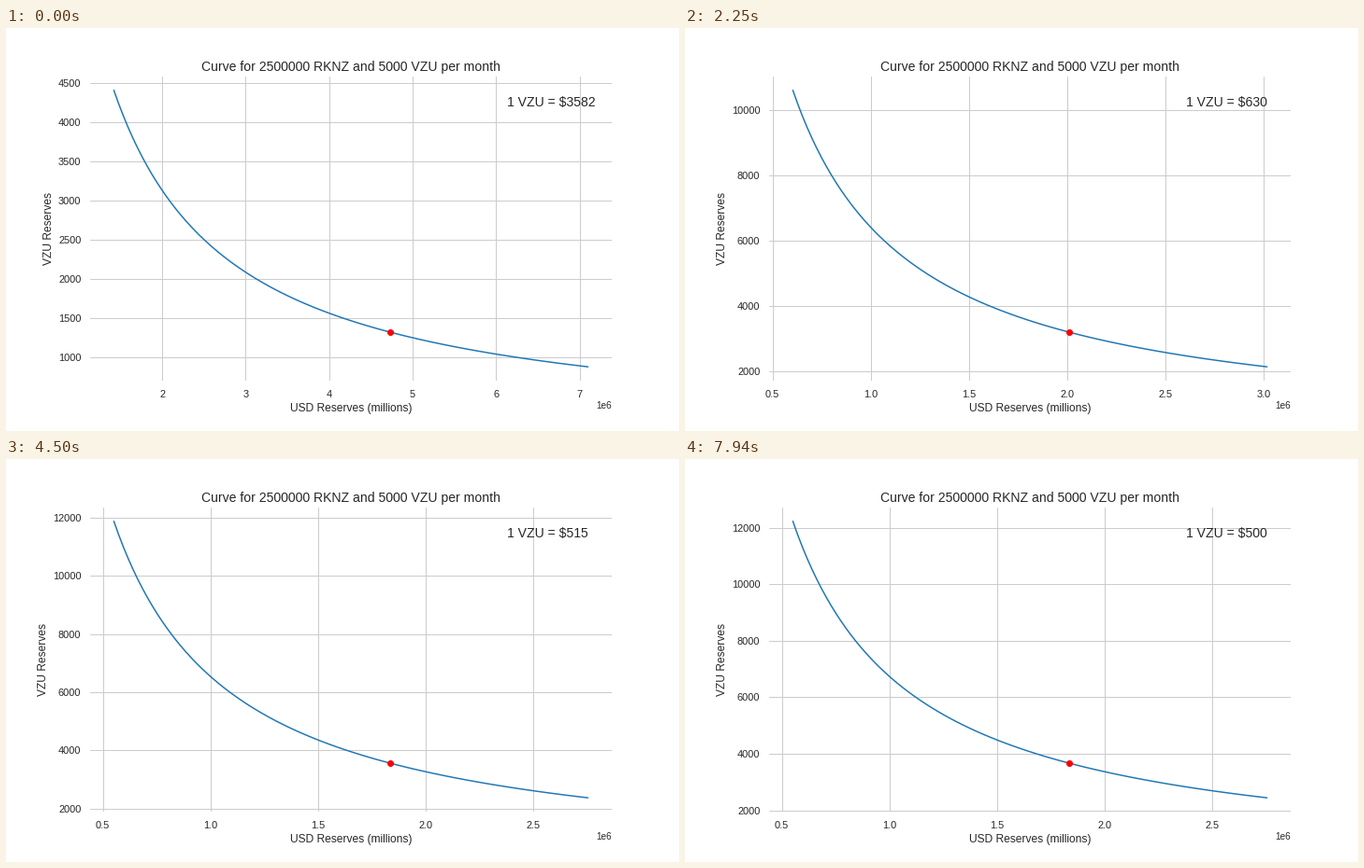
A matplotlib script for the animation above (8000 ms loop, 720 by 432 pixels).

```python
import numpy as np
import matplotlib.pyplot as plt
from matplotlib.animation import FuncAnimation

FRAMES, INTERVAL = 160, 50
CASH_PER_MONTH, COIN_PER_MONTH = 2500000, 5000
STEPS_PER_MONTH = 61
SUBSTEPS = 60
FEE = 0.01
INK, GRID = "#262626", "#cccccc"

plt.rcParams.update({
    "font.family": "Liberation Sans",
    "text.color": INK,
    "axes.labelcolor": INK,
    "xtick.color": INK,
    "ytick.color": INK,
    "axes.axisbelow": True,
    "lines.solid_capstyle": "round",
})


def swap(paid, pool_in, pool_out):
    """Amount a constant-product pool gives out, after the fee."""
    net = paid * (1 - FEE)
    return pool_out * net / (pool_in + net)


def simulate(steps):
    """Pool reserves after each step of steady two-way selling."""
    cash, coin = 5e6, 1250.0
    cash_in = CASH_PER_MONTH / STEPS_PER_MONTH / SUBSTEPS
    coin_in = COIN_PER_MONTH / STEPS_PER_MONTH / SUBSTEPS
    states = []
    for _ in range(steps):
        for _ in range(SUBSTEPS):
            cash_out = swap(coin_in, coin, cash)
            coin_out = swap(cash_in, cash, coin)
            cash += cash_in - cash_out
            coin += coin_in - coin_out
        states.append((cash, coin))
    return states


def padded(values, margin=0.05):
    low, high = values.min(), values.max()
    pad = (high - low) * margin
    return low - pad, high + pad


states = simulate(FRAMES)

fig = plt.figure(figsize=(10, 6), dpi=72, facecolor="white")
ax = fig.add_axes([0.125, 0.125, 0.775, 0.755])
for spine in ax.spines.values():
    spine.set_visible(False)
ax.grid(True, color=GRID, linewidth=1)
ax.tick_params(length=6, pad=3.5, labelsize=11, left=False, bottom=False)
ax.set_title(f"Curve for {CASH_PER_MONTH} RKNZ and {COIN_PER_MONTH} VZU per month",
             fontsize=14)
ax.set_xlabel("USD Reserves (millions)", fontsize=12)
ax.set_ylabel("VZU Reserves", fontsize=12)

curve, = ax.plot([], [], color="#1f77b4", linewidth=1.5)
dot, = ax.plot([], [], "o", color="red", markersize=6)
price = ax.text(0.8, 0.9, "", fontsize=14, transform=ax.transAxes,
                parse_math=False)


def draw(i):
    # playback slows slightly once the price has settled
    step = i - max(0, i - 98) // 11
    cash, coin = states[step]
    x = np.linspace(0.3 * cash, 1.5 * cash, 100)
    y = cash * coin / x
    curve.set_data(x, y)
    dot.set_data([cash], [coin])
    ax.set_xlim(padded(x))
    ax.set_ylim(padded(y))
    price.set_text(f"1 VZU = ${int(cash / coin)}")
    return curve, dot, price


anim = FuncAnimation(fig, draw, frames=FRAMES, init_func=lambda: draw(0),
                     interval=INTERVAL, repeat=True, repeat_delay=0, blit=False)
plt.show()
```
